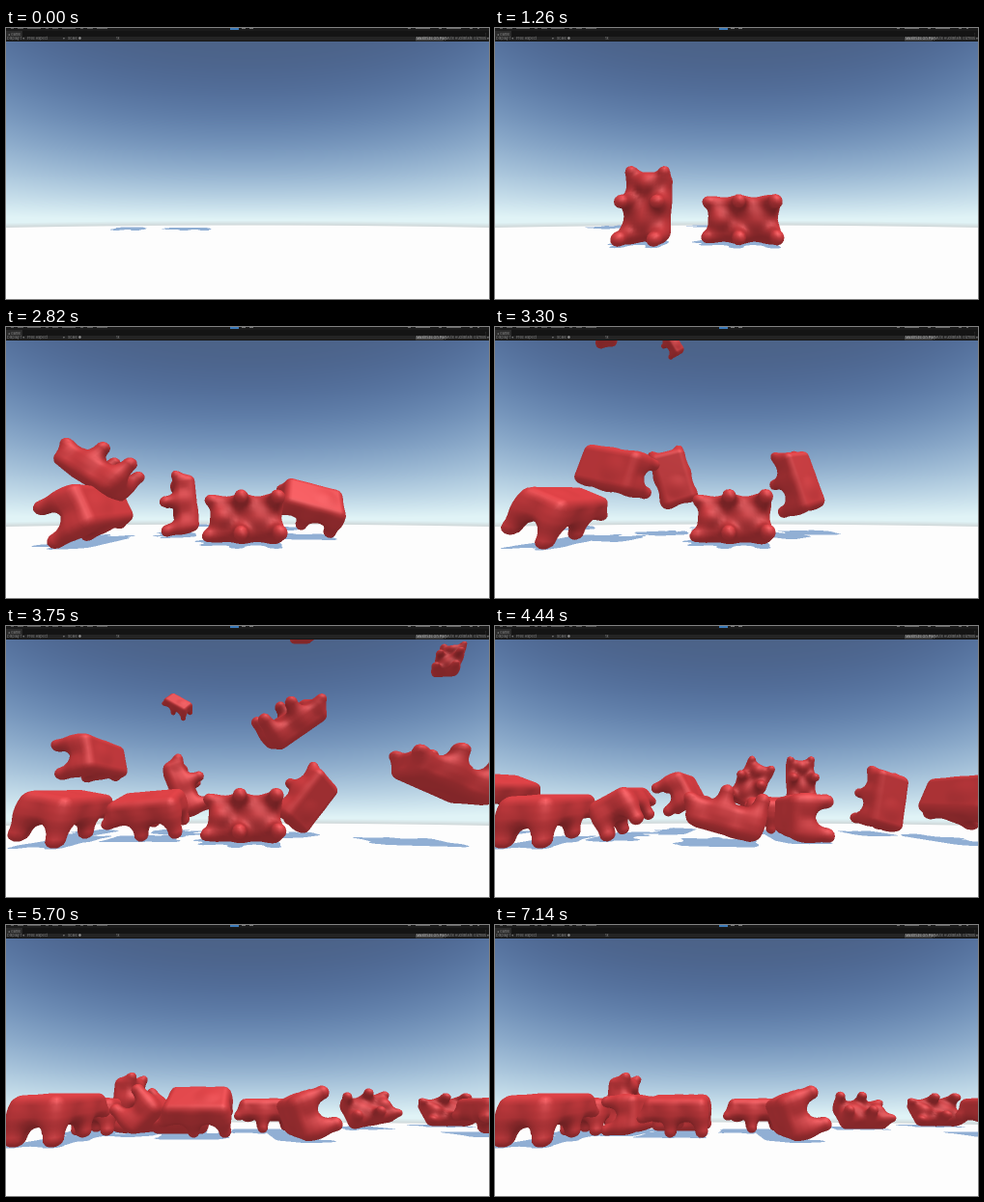
Recreate the animation shown at these times as an HTML page with a canvas. Size 500 by 281 pixels, loop 7170 ms.

```html
<!DOCTYPE html>
<html lang="en">
<head>
<meta charset="utf-8">
<title>Falling gummy bears</title>
<style>
html, body { margin: 0; width: 100%; height: 100%; overflow: hidden; background: #fdfdfd; }
canvas, svg { position: absolute; left: 0; top: 0; width: 500px; height: 281px; display: block; }
text { font: 3.7px Inter, Roboto, sans-serif; fill: #8c8c8c; }
</style>
</head>
<body>
<canvas id="sky" width="500" height="281"></canvas>
<canvas id="bears" width="1000" height="562"></canvas>
<svg viewBox="0 0 500 281">
  <rect width="500" height="14" fill="#1b1b1b"/>
  <rect y="3" width="500" height="6" fill="#141414"/>
  <rect y="3" width="17" height="6" fill="#2b2b2b"/>
  <rect y="9" width="500" height="5" fill="#242424"/>
  <rect y="13" width="500" height="1" fill="#161616"/>
  <path d="M5 .5H105" stroke="#5c5c5c" stroke-dasharray="3 4 6 4 14 5"/>
  <path d="M416 .5H490" stroke="#6a6a6a" stroke-dasharray="3 5 15 9"/>
  <rect x="232" width="9" height="2" fill="#3b79b8"/>
  <path d="M244 .5H256" stroke="#777" stroke-dasharray="4"/>
  <text x="2" y="7.6">◂ Game</text>
  <text x="1" y="12.4">Display 1 ▾</text>
  <text x="22" y="12.4">Free Aspect</text>
  <text x="59" y="12.4">▾</text>
  <text x="64" y="12.4">Scale ●</text>
  <text x="114" y="12.4">1x</text>
  <rect x="424" y="9.5" width="29" height="3.8" fill="#494949"/>
  <text x="425" y="12.4" style="fill:#bbb">Maximize On Play</text>
  <text x="455" y="12.4">Mute Audio</text>
  <text x="474" y="12.4">Stats</text>
  <text x="484" y="12.4">Gizmos ▾</text>
  <text x="495" y="7.6">⋮</text>
</svg>
<script>
const LOOP = 7170, STEP = 30, G = 9.8, SPEED = 14, SPIN = 90;
const W = 1000, H = 562, RAD = Math.PI / 180;
const FOCUS = 231, CX = 250, CY = 147.5, EYE = 0.9;
const CP = Math.cos(9.7 * RAD), SP = Math.sin(9.7 * RAD);
const LIGHT = [0.337, 0.842, -0.421], SLOPE_X = -0.3, SLOPE_Z = 0.45, FAR_EDGE = 12.7;
const clamp = (v, a, b) => Math.max(a, Math.min(b, v));
const mix = (a, b, u) => a + (b - a) * u;

// ---- sky and ground ----
function paintSky() {
  const top = [76, 99, 136], low = [224, 243, 246], curve = [2.4, 2, 1.45];
  const ctx = document.getElementById('sky').getContext('2d');
  const img = ctx.createImageData(500, 281);
  for (let y = 0; y < 281; y++) for (let x = 0; x < 500; x++) {
    const u = ((x - 250) / 250) ** 2, edge = 204 + 2.5 * u;
    const e = clamp((y + 60 * u * Math.max(0, 203 - y) / 190 - 14) / 184, 0, 1);
    const haze = 0.6 * clamp((y - edge + 5) / 5, 0, 1);
    const ground = clamp(y - edge + 0.5, 0, 1), o = (y * 500 + x) * 4;
    for (let c = 0; c < 3; c++) {
      const sky = mix(mix(top[c], low[c], e ** curve[c]), 195, haze);
      img.data[o + c] = mix(sky, 253, ground);
    }
    img.data[o + 3] = 255;
  }
  ctx.putImageData(img, 0, 0);
}

// ---- bear shape: smooth union of a slab, limbs, ears, snout and belly ----
function capsule(x, y, z, a, b, r) {
  const dx = b[0] - a[0], dy = b[1] - a[1], dz = b[2] - a[2];
  const px = x - a[0], py = y - a[1], pz = z - a[2];
  const h = clamp((px * dx + py * dy + pz * dz) / (dx * dx + dy * dy + dz * dz), 0, 1);
  return Math.hypot(px - dx * h, py - dy * h, pz - dz * h) - r;
}
function blend(a, b, k) {
  const h = Math.max(k - Math.abs(a - b), 0) / k;
  return Math.min(a, b) - h * h * k / 4;
}
function shape(x, y, z) {
  x = Math.abs(x);
  const qx = x - 0.36, qy = Math.abs(y) - 0.69, qz = Math.abs(z - 0.2) - 0.13;
  let d = Math.hypot(Math.max(qx, 0), Math.max(qy, 0), Math.max(qz, 0))
        + Math.min(Math.max(qx, qy, qz), 0) - 0.2;
  d = blend(d, capsule(x, y, z, [0.36, 0.75, 0.14], [0.44, 0.93, -0.04], 0.14), 0.22);
  d = blend(d, capsule(x, y, z, [0.36, 0.1, 0.1], [0.43, 0.12, -0.42], 0.17), 0.3);
  d = blend(d, capsule(x, y, z, [0.36, -0.68, 0.1], [0.42, -0.76, -0.42], 0.18), 0.3);
  d = blend(d, Math.hypot(x, y - 0.6, z + 0.05) - 0.2, 0.25);
  return blend(d, Math.hypot(x, y + 0.3, z - 0.12) - 0.34, 0.25);
}
function slope(x, y, z) {
  const e = 0.01;
  const n = [shape(x + e, y, z) - shape(x - e, y, z),
             shape(x, y + e, z) - shape(x, y - e, z),
             shape(x, y, z + e) - shape(x, y, z - e)];
  const l = Math.hypot(...n) || 1;
  return n.map(v => v / l);
}
function buildMesh() {
  const s = 0.085, nx = 18, ny = 28, nz = 18, ox = -0.7225, oy = -1.1475, oz = -0.75;
  const at = (i, j, k) => (i * ny + j) * nz + k;
  const val = new Float32Array(nx * ny * nz), cell = new Int32Array(val.length).fill(-1);
  const pos = [], nor = [], ao = [], tris = [];
  const each = f => {
    for (let i = 0; i < nx; i++) for (let j = 0; j < ny; j++) for (let k = 0; k < nz; k++) f(i, j, k);
  };
  each((i, j, k) => { val[at(i, j, k)] = shape(ox + i * s, oy + j * s, oz + k * s); });
  each((i, j, k) => {
    if (i === nx - 1 || j === ny - 1 || k === nz - 1) return;
    let inside = 0;
    for (let c = 0; c < 8; c++) inside += val[at(i + (c & 1), j + (c >> 1 & 1), k + (c >> 2))] < 0;
    if (!inside || inside === 8) return;
    let p = [ox + (i + 0.5) * s, oy + (j + 0.5) * s, oz + (k + 0.5) * s], n;
    for (let r = 0; r < 4; r++) {
      const d = shape(...p);
      n = slope(...p);
      p = p.map((v, a) => v - n[a] * d);
    }
    cell[at(i, j, k)] = ao.length;
    pos.push(...p);
    nor.push(...n);
    ao.push(clamp(0.68 + 0.32 * shape(...p.map((v, a) => v + n[a] * 0.3)) / 0.3, 0.6, 1));
  });
  const quad = (a, b, c, d) => {
    if (Math.min(a, b, c, d) >= 0) tris.push(a, b, c, a, c, d);
  };
  each((i, j, k) => {
    if (!i || !j || !k || i === nx - 1 || j === ny - 1 || k === nz - 1) return;
    const v = val[at(i, j, k)] < 0, c = (a, b, d) => cell[at(i - a, j - b, k - d)];
    if (v !== val[at(i + 1, j, k)] < 0) quad(c(0, 0, 0), c(0, 1, 0), c(0, 1, 1), c(0, 0, 1));
    if (v !== val[at(i, j + 1, k)] < 0) quad(c(0, 0, 0), c(1, 0, 0), c(1, 0, 1), c(0, 0, 1));
    if (v !== val[at(i, j, k + 1)] < 0) quad(c(0, 0, 0), c(1, 0, 0), c(1, 1, 0), c(0, 1, 0));
  });
  return { pos, nor, ao, tris, n: ao.length };
}
const mesh = buildMesh(), N = mesh.n;

// ---- rotations ----
function mul(a, b) {
  return [
    a[0] * b[0] - a[1] * b[1] - a[2] * b[2] - a[3] * b[3],
    a[0] * b[1] + a[1] * b[0] + a[2] * b[3] - a[3] * b[2],
    a[0] * b[2] - a[1] * b[3] + a[2] * b[0] + a[3] * b[1],
    a[0] * b[3] + a[1] * b[2] - a[2] * b[1] + a[3] * b[0]
  ];
}
function turn(axis, deg) {
  const q = [Math.cos(deg * RAD / 2), 0, 0, 0];
  q[axis] = Math.sin(deg * RAD / 2);
  return q;
}
function between(a, b, u) {
  const sign = a.reduce((s, v, i) => s + v * b[i], 0) < 0 ? -1 : 1;
  const q = a.map((v, i) => mix(v, b[i] * sign, u)), l = Math.hypot(...q);
  return q.map(v => v / l);
}
function matrix([w, x, y, z]) {
  return [
    1 - 2 * (y * y + z * z), 2 * (x * y - w * z), 2 * (x * z + w * y),
    2 * (x * y + w * z), 1 - 2 * (x * x + z * z), 2 * (y * z - w * x),
    2 * (x * z - w * y), 2 * (y * z + w * x), 1 - 2 * (x * x + y * y)
  ];
}
// Upright or leaning, turned about its own length; or with the head pointing away.
const stand = (twist = 0, lean = 0) => mul(turn(3, lean), turn(2, twist));
const lie = (twist = 0, lean = 90) => stand(twist, lean);
const away = roll => mul(mul(turn(3, roll), turn(1, 85)), turn(2, 180));

// ---- motion: time, screen place, distance, attitude ----
const bears = [];
function restHeight(q) {
  const m = matrix(q), p = mesh.pos;
  let low = 0;
  for (let i = 0; i < p.length; i += 3) low = Math.min(low, m[3] * p[i] + m[4] * p[i + 1] + m[5] * p[i + 2]);
  return -low;
}
class Bear {
  constructor() {
    this.keys = [];
    this.spin = bears.length < 2 ? 0 : SPIN * (-1) ** bears.length;
    bears.push(this);
  }
  add(t, sx, y, z, q, air) {
    const d = (y - EYE) * SP + z * CP;
    this.keys.push({ t, q, air, p: [(sx - CX) / FOCUS * d, y, z] });
    return this;
  }
  ground(t, sx, z, q) {
    return this.add(t, sx, restHeight(q), z, q, false);
  }
  fly(t, sx, sy, z, q) {
    const k = (CY - sy) / FOCUS;
    return this.add(t, sx, EYE + z * (k * CP + SP) / (CP - k * SP), z, q, true);
  }
  at(t) {
    const { keys } = this, first = keys[0];
    if (t < first.t) {
      const s = (first.t - t) / 1000, [x, y, z] = first.p;
      if (s > SPEED / G) return null;
      return { p: [x, y + SPEED * s - G / 2 * s * s, z], q: mul(first.q, turn(1, this.spin * s)) };
    }
    let i = 0;
    while (i < keys.length - 2 && keys[i + 1].t <= t) i++;
    const a = keys[i], b = keys[i + 1], u = clamp((t - a.t) / (b.t - a.t), 0, 1);
    const air = a.air || b.air, e = air ? u : u * (2 - u);
    const p = a.p.map((v, k) => mix(v, b.p[k], e));
    if (air) p[1] += G / 2 * (Math.min(b.t - a.t, 700) / 1000) ** 2 * u * (1 - u);
    return { p, q: between(a.q, b.q, e) };
  }
}
const bear = () => new Bear();

bear().ground(1000, 156, 5.9, stand()).ground(2400, 156, 5.9, stand())
  .ground(2820, 89, 5.9, away(-60)).ground(3750, 66, 5.8, away(-10)).ground(4440, 60, 5.8, away(0));
bear().ground(1000, 259, 5.9, lie()).ground(3750, 247, 5.7, lie(-15))
  .ground(4440, 240, 5.7, lie(-100, 75)).ground(5700, 200, 6.6, lie(130)).ground(6400, 190, 6.9, lie(100));
bear().fly(2350, 140, 140, 6, stand(-60, 20)).fly(2820, 98, 147, 6.1, lie(-110, 60))
  .ground(3750, 149, 6.3, lie(110, 95)).ground(4440, 137, 6.8, away(30))
  .ground(5700, 147, 7.5, away(-135)).ground(6400, 144, 7.7, away(-85));
bear().ground(2300, 178, 7.5, stand(70)).ground(2820, 180, 7.5, stand(75, 8))
  .fly(3750, 187, 167, 7.5, stand(-110, 25)).fly(4440, 193, 173, 8, away(-60))
  .ground(5700, 133, 8, stand(-90)).ground(6400, 138, 8, stand(-90));
bear().ground(2450, 305, 7, lie(120, 60)).ground(2820, 314, 6.9, lie(140, 75))
  .fly(3750, 308, 178, 7, stand(150, -40)).ground(4440, 287, 8, lie(100)).ground(5700, 268, 8, lie(90));
bear().fly(3750, 92, 139, 6.9, away(-75)).fly(4440, 2, 174, 7, away(-20)).ground(5700, 90, 7.4, lie(90));
bear().fly(3750, 178, 83, 15.5, lie(150, 60)).fly(4440, 264, 164, 8.8, stand(10, -30))
  .ground(5700, 182, 7.6, lie(-60)).ground(6400, 192, 8.4, lie(-90));
bear().fly(3750, 293, 97, 6.2, stand(70, -55)).ground(4100, 304, 6.5, away(60))
  .ground(4440, 315, 6.5, away(88)).ground(5000, 308, 6.5, away(110));
bear().fly(3750, 452, 150, 5.3, lie(-85, 65)).fly(4440, 488, 182, 6, away(60))
  .ground(5700, 512, 7, lie(90)).ground(6400, 528, 7, lie(90));
bear().fly(3750, 458, 34, 11.5, stand(40, -25)).fly(4440, 398, 180, 7.5, stand(170, -15))
  .ground(5700, 457, 10, lie(-30));
bear().fly(4440, 317, 161, 9.3, stand()).ground(5700, 375, 9, stand(35, -80)).ground(6200, 379, 9, stand(50, -90));

// ---- renderer ----
const ctx = document.getElementById('bears').getContext('2d');
const img = ctx.createImageData(W, H), pix = new Uint32Array(img.data.buffer);
const depth = new Float32Array(W * H);
const make = () => new Float32Array(N);
const wx = make(), wy = make(), wz = make(), sx = make(), sy = make(), iz = make();
const gx = make(), gy = make(), gz = make(), lit = make(), shine = make(), facing = make();
const SHADOW = 0xff000000 | 212 << 16 | 175 << 8 | 145;

function project(x, y, z, i, ox, oy, oz) {
  const v = y - EYE, d = Math.max(0.2, v * SP + z * CP);
  ox[i] = 2 * (CX + FOCUS * x / d);
  oy[i] = 2 * (CY - FOCUS * (v * CP - z * SP) / d);
  oz[i] = 1 / d;
}
function place({ p, q }) {
  const m = matrix(q), { pos, nor, ao } = mesh;
  const spin = (list, i, r) => m[r] * list[3 * i] + m[r + 1] * list[3 * i + 1] + m[r + 2] * list[3 * i + 2];
  let low = 0;
  for (let i = 0; i < N; i++) {
    wx[i] = p[0] + spin(pos, i, 0);
    wy[i] = p[1] + spin(pos, i, 3);
    wz[i] = p[2] + spin(pos, i, 6);
    low = Math.min(low, wy[i]);
  }
  for (let i = 0; i < N; i++) {
    wy[i] -= low;
    const x = spin(nor, i, 0), y = spin(nor, i, 3), z = spin(nor, i, 6);
    const ex = -wx[i], ey = EYE - wy[i], ez = -wz[i], el = Math.hypot(ex, ey, ez);
    const hx = LIGHT[0] + ex / el, hy = LIGHT[1] + ey / el, hz = LIGHT[2] + ez / el;
    const glow = Math.max(0, (x * hx + y * hy + z * hz) / Math.hypot(hx, hy, hz));
    const sun = Math.max(0, x * LIGHT[0] + y * LIGHT[1] + z * LIGHT[2]);
    facing[i] = x * ex + y * ey + z * ez;
    lit[i] = (0.71 + 0.1 * y + 0.27 * sun) * ao[i];
    shine[i] = 42 * glow ** 12 * ao[i];
    project(wx[i], wy[i], wz[i], i, sx, sy, iz);
    const fx = wx[i] + SLOPE_X * wy[i], fz = wz[i] + SLOPE_Z * wy[i];
    project(fx, 0, fz, i, gx, gy, gz);
    gz[i] = fz;
  }
}
function fill(a, b, c, X, Y, flat) {
  const ax = X[a], ay = Y[a], bx = X[b], by = Y[b], cx = X[c], cy = Y[c];
  const area = (bx - ax) * (cy - ay) - (cx - ax) * (by - ay);
  if (Math.abs(area) < 1e-6) return;
  const x0 = Math.max(0, Math.ceil(Math.min(ax, bx, cx))), x1 = Math.min(W - 1, Math.max(ax, bx, cx));
  const y0 = Math.max(28, Math.ceil(Math.min(ay, by, cy))), y1 = Math.min(H - 1, Math.max(ay, by, cy));
  for (let y = y0; y <= y1; y++) for (let x = x0; x <= x1; x++) {
    const v = ((x - ax) * (cy - ay) - (cx - ax) * (y - ay)) / area;
    const w = ((bx - ax) * (y - ay) - (x - ax) * (by - ay)) / area, u = 1 - v - w;
    if (u < -1e-4 || v < -1e-4 || w < -1e-4) continue;
    const o = y * W + x;
    if (flat) { pix[o] = SHADOW; continue; }
    const d = u * iz[a] + v * iz[b] + w * iz[c];
    if (d <= depth[o]) continue;
    depth[o] = d;
    const l = u * lit[a] + v * lit[b] + w * lit[c], s = u * shine[a] + v * shine[b] + w * shine[c];
    const r = Math.min(255, 212 * l + s), g = 63 * l + s, bl = 67 * l + s;
    pix[o] = 0xff000000 | bl << 16 | g << 8 | r;
  }
}
function render(t) {
  pix.fill(0);
  depth.fill(0);
  const shown = bears.map(b => b.at(t)).filter(Boolean), T = mesh.tris;
  for (const flat of [true, false]) for (const pose of shown) {
    place(pose);
    for (let i = 0; i < T.length; i += 3) {
      const a = T[i], b = T[i + 1], c = T[i + 2];
      if (flat) {
        if (gz[a] < FAR_EDGE && gz[a] > 1) fill(a, b, c, gx, gy, true);
      } else if (facing[a] > 0 || facing[b] > 0 || facing[c] > 0) fill(a, b, c, sx, sy, false);
    }
  }
  ctx.putImageData(img, 0, 0);
}

paintSky();
const start = performance.now();
let last = -1;
function tick() {
  const t = Math.floor((performance.now() - start) % LOOP / STEP) * STEP;
  if (t !== last) render(last = t);
  requestAnimationFrame(tick);
}
tick();
</script>
</body>
</html>
```
